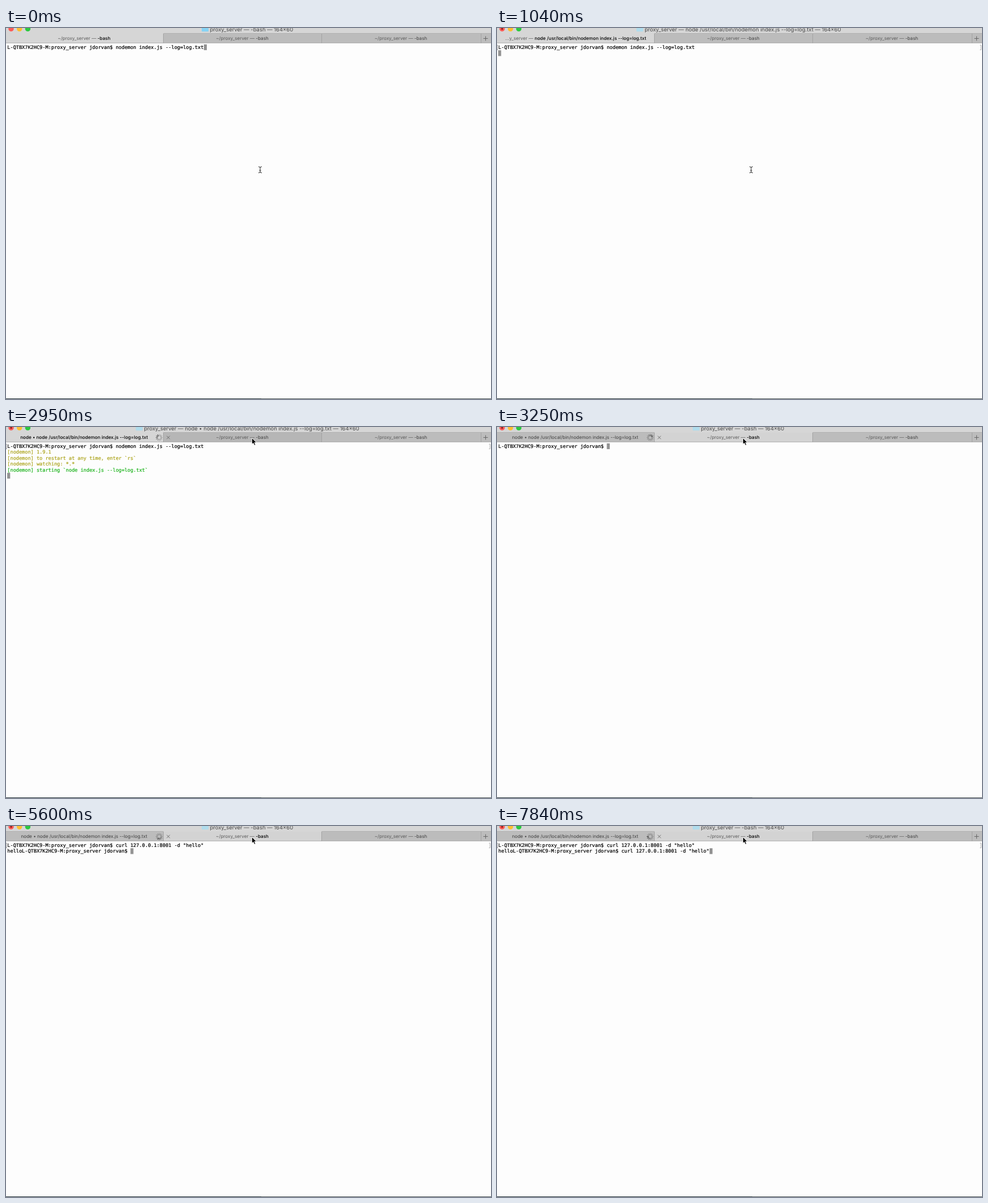
These frames come from a looping animation (855x655 px, 7.99 s). An HTML page:

```html
<!DOCTYPE html>
<html lang="en">
<head>
<meta charset="utf-8">
<title>Terminal session</title>
<style>
html, body { margin: 0; width: 100%; height: 100%; overflow: hidden; background: #fdfdfd; }
svg { display: block; width: 100vw; height: 100vh; }
text { white-space: pre; text-rendering: geometricPrecision; }
.ui { font-family: Inter, Roboto, sans-serif; font-size: 8.15px; }
.title { font-family: Inter, Roboto, sans-serif; font-size: 9.46px; fill: #484848; }
.mono { font-family: "DejaVu Sans Mono", monospace; font-size: 8.595px; stroke-width: 0.22px; }
</style>
</head>
<body>
<svg id="stage" viewBox="0 0 855 655"></svg>
<script>
const LOOP = 7990;
const ENTER = 590, OUTPUT = 1190, SWITCH = 3250, RECALL = 3690, REPLY = 4730, REPEAT = 7690;
const COL = 5.175, LEFT = 2.3, ROW = 10.4;

const stage = document.getElementById("stage");

function add(tag, attrs = {}, parent = stage, text) {
  const el = document.createElementNS("http://www.w3.org/2000/svg", tag);
  for (const key in attrs) el.setAttribute(key, attrs[key]);
  if (text !== undefined) el.textContent = text;
  parent.appendChild(el);
  return el;
}
const rect = (x, y, width, height, fill, parent) => add("rect", { x, y, width, height, fill }, parent);
const line = (d, stroke, width = 1, parent) =>
  add("path", { d, stroke, fill: "none", "stroke-width": width }, parent);
const show = (el, on) => el.setAttribute("visibility", on ? "visible" : "hidden");
const set = (el, attrs) => { for (const key in attrs) el.setAttribute(key, attrs[key]); };

// Window frame
rect(0, 0, 855, 655, "#fdfdfd");
rect(0, 0, 855, 10, "#d6d6d6");
rect(0, 10, 855, 17, "#bcbcbc");
const tabs = [[0, 277.5], [277.5, 279], [556.5, 280.5]].map(([x, w]) => {
  const body = rect(x, 10, w, 17, "#bcbcbc");
  const edge = rect(x, 9, w, 1, "#b2b2b2");
  return { body, edge };
});
rect(837, 9, 18, 1, "#b2b2b2");
line("M0 26.5H855", "#b0b0b0");
line("M277.5 10V27M556.5 10V27M837.5 10V27", "#a3a3a3");
line("M841.5 18.5H849.5M845.5 14.5V22.5", "#666");
rect(0, 654, 450, 1, "#26343a");
rect(450, 654, 405, 1, "#50585b");

[["#fc5b57", 9], ["#fdbe30", 23.7], ["#2bc840", 38.4]].forEach(([fill, cx]) =>
  add("circle", { cx, cy: 1.4, r: 4.7, fill }));
const redDot = add("circle", { cx: 9, cy: 1.6, r: 1.5, fill: "#7d100d" });

const folder = add("path", { d: "M0 0H12V5.5Q12 6.3 11 6.3H1Q0 6.3 0 5.5Z" });
const title = add("text", { class: "title", y: 5.6 });

// Tab labels
function label(x, lead, name, anchor = "middle") {
  const el = add("text", { class: "ui", x, y: 21.4, "text-anchor": anchor });
  add("tspan", { fill: "#5c5c5c" }, el, lead);
  const tail = add("tspan", {}, el, name);
  return { el, tail };
}
const paint = (tab, active) => set(tab.tail, {
  fill: active ? "#000" : "#404040",
  "font-weight": active ? 500 : 400
});
const run = "node /usr/local/bin/nodemon index.js --log=log.txt";
const shell = "~/proxy_server — ";
const first = [
  label(137.7, shell, "-bash"),
  label(14.5, "…y_server — ", run, "start"),
  label(137.7, "", "node • " + run)
];
const second = label(416.5, shell, "-bash");
paint(label(696, shell, "-bash"), false);
const close = line("M283.3 15.7L288.9 21.3M288.9 15.7L283.3 21.3", "#666", 0.9);

const spinner = add("g", { transform: "translate(270 18.6)" });
const spokes = Array.from({ length: 12 }, (_, i) => add("path", {
  d: "M0 -3V-5.6", stroke: "#2a2a2a", "stroke-width": 1.1,
  "stroke-linecap": "round", transform: `rotate(${i * 30})`
}, spinner));

// Terminal screens
const prompt = "L-QTBX7K2HC9-M:proxy_server jdorvan$ ";
const startCmd = prompt + "nodemon index.js --log=log.txt";
const curl = 'curl 127.0.0.1:8001 -d "hello"';
const yellow = "#aba31a", green = "#1bb21b";
const log = [
  ["[nodemon] 1.9.1", yellow],
  ["[nodemon] to restart at any time, enter `rs`", yellow],
  ["[nodemon] watching: *.*", yellow],
  ["[nodemon] starting `node index.js --log=log.txt`", green]
];
const caret = rect(0, 0, 5.2, 10.2, "#929292");
const rows = Array.from({ length: 5 }, (_, i) =>
  add("text", { class: "mono", x: LEFT, y: 37 + i * ROW }));
const marks = add("g");
line("M-.5 30.2H1.6M.5 30.2V38.6M-.5 38.6H1.6", "#858585", 0.9, marks);
line("M851.3 30.2H853.3V38.6H851.3", "#a8a8a8", 0.9, marks);

function screen(t) {
  if (t < ENTER) return [[startCmd]];
  if (t < OUTPUT) return [[startCmd], [""]];
  if (t < SWITCH) return [[startCmd], ...log, [""]];
  if (t < RECALL) return [[prompt]];
  if (t < REPLY) return [[prompt + curl]];
  return [[prompt + curl], ["hello" + prompt + (t < REPEAT ? "" : curl)]];
}

// Pointer
const beam = add("g");
const beamPath = "M-3 -5.5Q0 -5.5 0 -3.5Q0 -5.5 3 -5.5M0 -4V4M-3 5.5Q0 5.5 0 3.5Q0 5.5 3 5.5M-1.5 1H1.5";
line(beamPath, "#fff", 2, beam);
line(beamPath, "#2c2c2c", 1, beam);
const arrow = add("path", {
  d: "M0 0V11L2.5 8.7L4.3 12.8L6.3 12L4.5 8H8Z",
  fill: "#000", stroke: "#fff", "stroke-width": 0.8
});
const path = [
  [1250, 448, 250.3], [1480, 440, 176], [1630, 430, 104],
  [1770, 424, 76.3], [2060, 430, 38], [2300, 433.5, 19.5]
];
function pointer(t) {
  if (t <= path[0][0]) return path[0].slice(1);
  for (let i = 1; i < path.length; i++) {
    const [t0, x0, y0] = path[i - 1], [t1, x1, y1] = path[i];
    if (t < t1) {
      const k = (t - t0) / (t1 - t0);
      return [x0 + (x1 - x0) * k, y0 + (y1 - y0) * k];
    }
  }
  return path[path.length - 1].slice(1);
}

function drawWindow(t, hover) {
  const other = t >= SWITCH;
  const kind = t < ENTER ? 0 : t < OUTPUT ? 1 : 2;
  const shellTitle = kind === 0 || other;
  const process = shellTitle ? "-bash" : kind === 1 ? run : "node • " + run;
  const x = shellTitle ? 359.5 : kind === 1 ? 260.3 : 243.3;
  title.textContent = `proxy_server — ${process} — 164×60`;
  title.setAttribute("x", x);
  set(folder, { transform: `translate(${x - 14.5} 0)`, fill: kind ? "#b0dcec" : "#86d3f5" });
  show(redDot, kind > 0);

  tabs[0].body.setAttribute("fill", other ? "#bcbcbc" : "#d6d6d6");
  tabs[1].body.setAttribute("fill", other ? "#d3d3d3" : hover ? "#b6b6b6" : "#bcbcbc");
  show(tabs[0].edge, other);
  show(tabs[1].edge, !other);
  first.forEach((tab, i) => { show(tab.el, i === kind); paint(tab, !other); });
  paint(second, other);
  show(close, hover);

  show(spinner, kind === 2);
  const head = Math.floor(t * 12 / 1000 - 0.15);
  spokes.forEach((el, i) => {
    const age = (((head - i) % 12) + 12) % 12;
    el.setAttribute("stroke-opacity", Math.max(0.36, 0.95 - age * 0.14));
  });
}

function drawTerminal(t) {
  const lines = screen(t), last = lines.length - 1;
  rows.forEach((row, i) => {
    const [text, fill = "#000"] = lines[i] || [""];
    row.textContent = text;
    set(row, { fill, stroke: fill });
  });
  set(caret, { x: LEFT - 0.2 + lines[last][0].length * COL, y: 28.9 + last * ROW });
  show(marks, last > 0);
}

function render(t) {
  const [x, y] = pointer(t), hover = y < 27;
  drawWindow(t, hover);
  drawTerminal(t);
  show(beam, !hover);
  show(arrow, hover);
  (hover ? arrow : beam).setAttribute("transform", `translate(${x} ${y})`);
}

const begin = performance.now();
function tick() {
  render((performance.now() - begin) % LOOP);
  requestAnimationFrame(tick);
}
tick();
</script>
</body>
</html>
```
